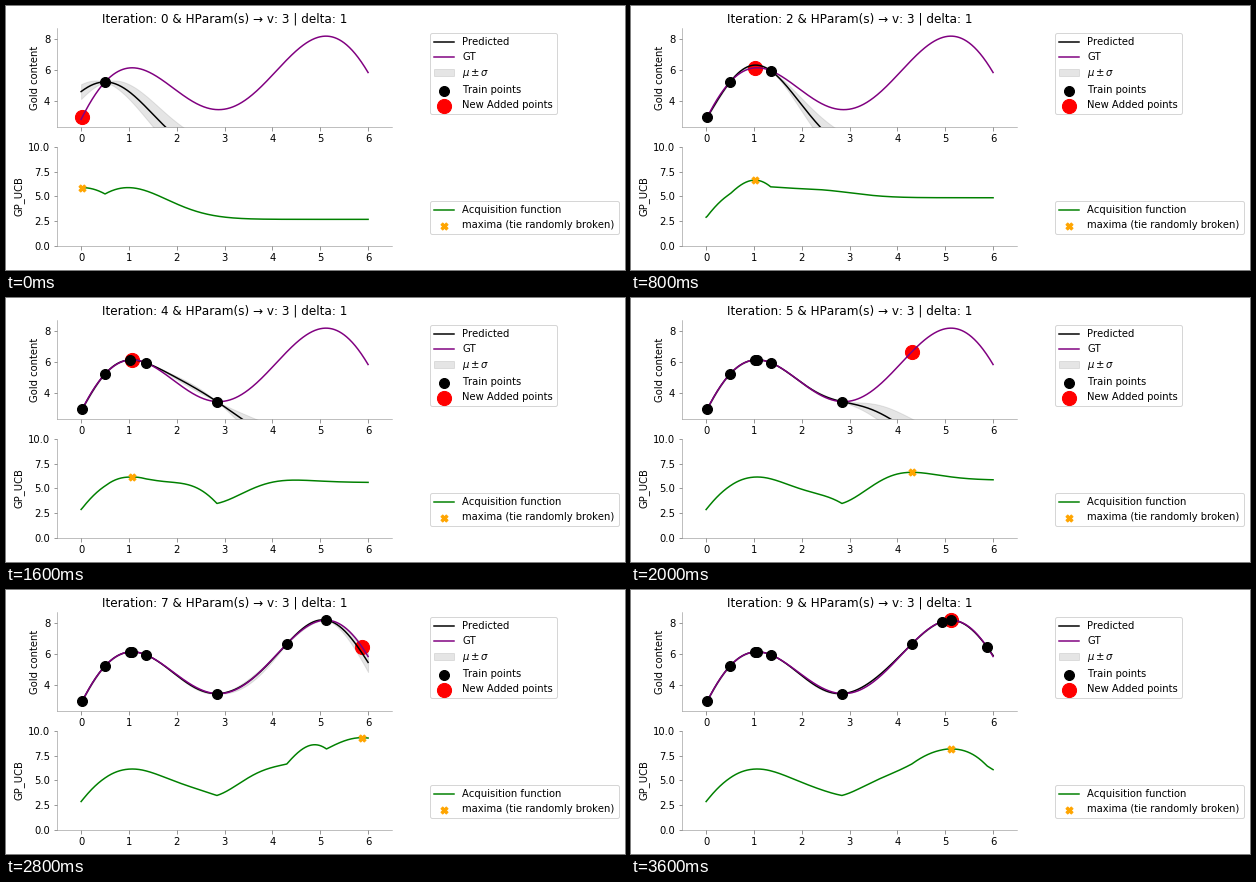
These frames come from a looping animation (619x264 px, 4 s). A matplotlib script:

```python
import numpy as np
import matplotlib.pyplot as plt
from matplotlib.animation import FuncAnimation

W, H, DPI = 619, 264, 72
LEFT, BOTTOM, AX_W, AX_H, GAP = 51.2, 24.22, 334.8, 98.84, 19.77
V, DELTA = 3, 1
START = 0.5
PICKS = [0.02, 1.35, 1.02, 2.84, 1.07, 4.3, 5.13, 5.87, 4.93, 5.12]
SPINE = "gray"


def truth(x):
    u = x - 3
    return 2 * u * np.sin(u) + 0.5 * x + 2


grid = np.linspace(0, 6, 601)
gt = truth(grid)


def rbf(a, b):
    return np.exp(-0.5 * (a[:, None] - b[None, :]) ** 2)


def posterior(train, x):
    K = rbf(train, train) + 1e-10 * np.eye(len(train))
    ks = rbf(train, x)
    weights = np.linalg.solve(K, ks)
    mu = weights.T @ truth(train)
    var = 1 - np.sum(ks * weights, axis=0)
    return mu, np.sqrt(np.clip(var, 0, None))


def ucb(mu, sigma, step):
    beta = 2 * np.log((step + 1) ** 2.5 * np.pi ** 2 / (3 * DELTA))
    return mu + np.sqrt(V * beta) * sigma


def make_axes(bottom, ylabel, ylim, yticks):
    ax = fig.add_axes([LEFT / W, bottom / H, AX_W / W, AX_H / H])
    for side in ("top", "right"):
        ax.spines[side].set_visible(False)
    for side in ("left", "bottom"):
        ax.spines[side].set_color(SPINE)
        ax.spines[side].set_linewidth(0.5)
    ax.tick_params(direction="out", color=SPINE)
    ax.set(xlim=(-0.5, 6.5), ylim=ylim, xticks=range(7), yticks=yticks, ylabel=ylabel)
    return ax


def draw_band(mu, sigma):
    return top.fill_between(grid, mu - sigma, mu + sigma, color="gray",
                            alpha=0.2, label=r"$\mu \pm \sigma$")


plt.rcParams.update({"font.family": "DejaVu Sans", "font.size": 10,
                     "text.kerning_factor": 6})
fig = plt.figure(figsize=((W + 0.001) / DPI, (H + 0.001) / DPI), dpi=DPI,
                 facecolor="white")
top = make_axes(BOTTOM + AX_H + GAP, "Gold content",
                (gt.min() - 0.5, gt.max() + 0.5), [4, 6, 8])
low = make_axes(BOTTOM, "GP_UCB", (0, 10), [0, 2.5, 5, 7.5, 10])

pred, = top.plot([], [], color="black", label="Predicted")
true_line, = top.plot(grid, gt, color="purple", label="GT")
known = top.scatter([], [], s=100, color="black", zorder=10, label="Train points")
added = top.scatter([], [], s=200, color="red", zorder=1.5, label="New Added points")
acq, = low.plot([], [], color="green", label="Acquisition function")
best = low.scatter([], [], s=50, marker="X", color="orange", zorder=10,
                   label="maxima (tie randomly broken)")
band = draw_band(gt, 0 * gt)

top.legend(handles=[pred, true_line, band, known, added], loc="upper left",
           bbox_to_anchor=(1.1, 1))
low.legend(handles=[acq, best], loc="upper left", bbox_to_anchor=(1.1, 0.5))


def update(step):
    global band
    train = np.array([START] + PICKS[:step])
    pick = np.array([PICKS[step]])
    mu, sigma = posterior(train, grid)
    band.remove()
    band = draw_band(mu, sigma)
    pred.set_data(grid, mu)
    known.set_offsets(np.column_stack([train, truth(train)]))
    added.set_offsets(np.column_stack([pick, truth(pick)]))
    acq.set_data(grid, ucb(mu, sigma, step))
    best.set_offsets(np.column_stack([pick, ucb(*posterior(train, pick), step)]))
    top.set_title(f"Iteration: {step} & HParam(s) → v: {V} | delta: {DELTA}",
                  fontsize=12)
    return []


anim = FuncAnimation(fig, update, frames=len(PICKS), init_func=lambda: update(0),
                     interval=400, repeat=True, repeat_delay=0, blit=False)
plt.show()
```
